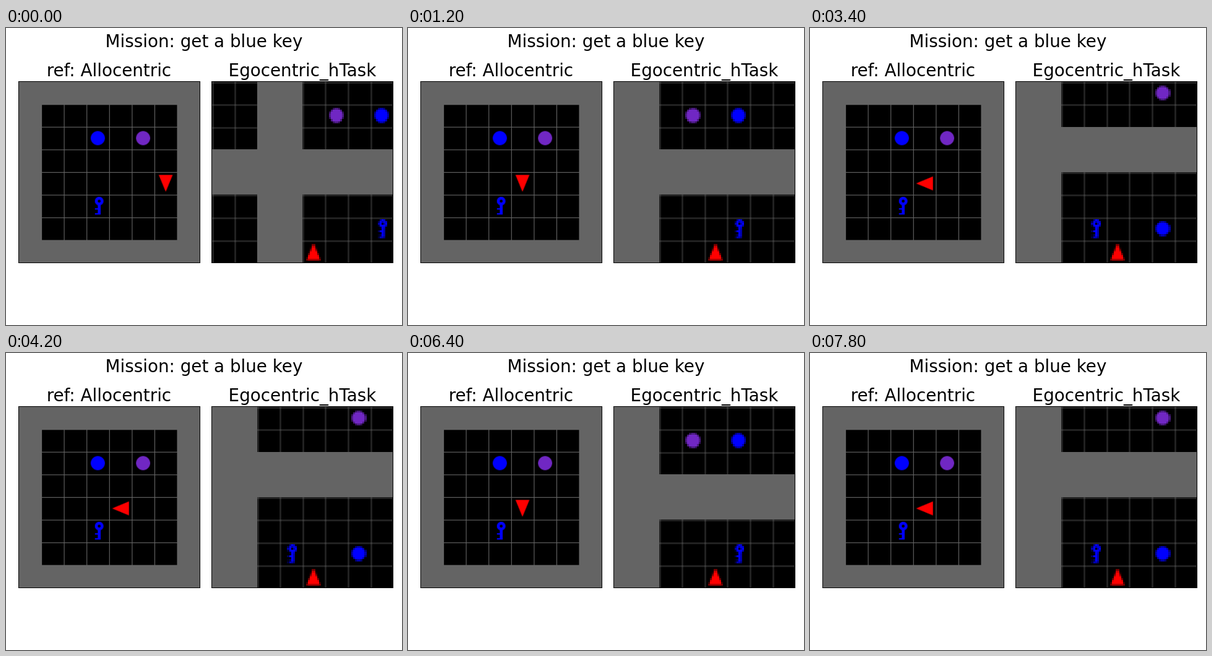
An HTML page with a canvas that plays this animation: 640x480 px, repeating every 8 s.

```html
<!DOCTYPE html>
<html lang="en">
<head>
<meta charset="utf-8">
<title>Grid world</title>
<style>
  html, body { margin: 0; width: 100%; height: 100%; overflow: hidden; background: #fff; }
  canvas, svg { position: absolute; left: 0; top: 0; display: block; }
  text { font: 27.78px "DejaVu Sans", sans-serif; text-anchor: middle; fill: #000; }
</style>
</head>
<body>
<canvas id="stage" width="640" height="480"></canvas>
<svg width="640" height="480">
  <text x="320" y="31">Mission: get a blue key</text>
  <text x="166.4" y="78">ref: Allocentric</text>
  <text x="479" y="78">Egocentric_hTask</text>
</svg>
<script>
const N = 8, STEP = 200, STEPS = 40, DOWN = 1, LEFT = 2, UP = 3;
const GREY = [100, 100, 100], BLUE = [0, 0, 255], PURPLE = [112, 39, 195],
      RED = [255, 0, 0], BLACK = [0, 0, 0];

// Shapes are point tests in the unit square of a tile.
const rect = (x0, x1, y0, y1) => (x, y) => x >= x0 && x <= x1 && y >= y0 && y <= y1;
const disc = (cx, cy, r) => (x, y) => (x - cx) ** 2 + (y - cy) ** 2 <= r * r;
const arrow = (x, y) => x >= 0.12 && x <= 0.87 && Math.abs(y - 0.5) <= 0.31 * (0.87 - x) / 0.75;
const rotate = (shape, dir) => {
  const c = Math.round(Math.cos(dir * Math.PI / 2)), s = Math.round(Math.sin(dir * Math.PI / 2));
  return (x, y) => shape(0.5 + (x - 0.5) * c + (y - 0.5) * s, 0.5 + (y - 0.5) * c - (x - 0.5) * s);
};

const KINDS = {
  empty: [],
  wall: [[GREY, rect(0, 1, 0, 1)]],
  blueBall: [[BLUE, disc(0.5, 0.5, 0.31)]],
  purpleBall: [[PURPLE, disc(0.5, 0.5, 0.31)]],
  key: [
    [BLUE, rect(0.50, 0.63, 0.31, 0.88)],
    [BLUE, rect(0.38, 0.50, 0.59, 0.66)],
    [BLUE, rect(0.38, 0.50, 0.81, 0.88)],
    [BLUE, disc(0.56, 0.28, 0.19)],
    [BLACK, disc(0.56, 0.28, 0.064)]
  ]
};
for (const dir of [DOWN, LEFT, UP]) KINDS["agent" + dir] = [[RED, rotate(arrow, dir)]];
const GRID = [[GREY, rect(0, 0.031, 0, 1)], [GREY, rect(0, 1, 0, 0.031)]];
const ITEMS = { "3,2": "blueBall", "5,2": "purpleBall", "3,5": "key" };

function makeCanvas(size) {
  const c = document.createElement("canvas");
  c.width = c.height = size;
  return c;
}

// Each pixel is the mean of 3 x 3 samples.
function renderTile(kind, size) {
  const tile = makeCanvas(size), ctx = tile.getContext("2d");
  const img = ctx.createImageData(size, size), shapes = GRID.concat(KINDS[kind]);
  for (let p = 0; p < size * size; p++) {
    const sum = [0, 0, 0];
    for (let s = 0; s < 9; s++) {
      const x = (p % size + (s % 3 + 0.5) / 3) / size;
      const y = (Math.floor(p / size) + (Math.floor(s / 3) + 0.5) / 3) / size;
      let color = BLACK;
      for (const [c, inside] of shapes) if (inside(x, y)) color = c;
      for (let i = 0; i < 3; i++) sum[i] += color[i];
    }
    img.data.set([...sum.map(v => v / 9), 255], p * 4);
  }
  ctx.putImageData(img, 0, 0);
  return tile;
}

const cache = {};
const getTile = (kind, size) => cache[kind + size] ||= renderTile(kind, size);

// The world wraps around at its edges.
function kindAt(x, y) {
  x &= N - 1;
  y &= N - 1;
  const edge = v => v === 0 || v === N - 1;
  return edge(x) || edge(y) ? "wall" : ITEMS[x + "," + y] || "empty";
}

function makeView(size) {
  const view = makeCanvas(N * size), ctx = view.getContext("2d");
  return kindOf => {
    for (let row = 0; row < N; row++)
      for (let col = 0; col < N; col++)
        ctx.drawImage(getTile(kindOf(col, row), size), col * size, row * size);
    return view;
  };
}

const drawWorld = makeView(32), drawEgo = makeView(12);
const stage = document.getElementById("stage").getContext("2d");

// Walk two cells west, then keep turning between south and west.
function agentAt(step) {
  const x = step < 2 ? 6 : step < 3 ? 5 : 4;
  const dir = step === 2 || step % 2 ? LEFT : DOWN;
  return { x, y: 4, dir };
}

function drawPanel(view, x, spineX, smooth) {
  stage.imageSmoothingEnabled = smooth;
  stage.drawImage(view, x, 86.5, 292.7, 292.7);
  stage.strokeRect(spineX + 0.5, 86.5, 293, 293);
}

function draw(step) {
  const { x, y, dir } = agentAt(step);
  const fx = dir === LEFT ? -1 : 0, fy = dir === DOWN ? 1 : 0;
  stage.fillStyle = "#fff";
  stage.fillRect(0, 0, 640, 480);
  stage.strokeStyle = "#000";
  stage.lineWidth = 1;
  drawPanel(drawWorld((c, r) => c === x && r === y ? "agent" + dir : kindAt(c, r)), 20.3, 20, true);
  drawPanel(drawEgo((c, r) => {
    const ahead = 7 - r, side = c - 4;
    if (!ahead && !side) return "agent" + UP;
    return kindAt(x + fx * ahead - fy * side, y + fy * ahead + fx * side);
  }), 332.5, 332, false);
}

let shown = -1;
function tick() {
  const step = Math.floor(performance.now() / STEP) % STEPS;
  if (step !== shown) draw(shown = step);
  requestAnimationFrame(tick);
}
tick();
</script>
</body>
</html>
```
